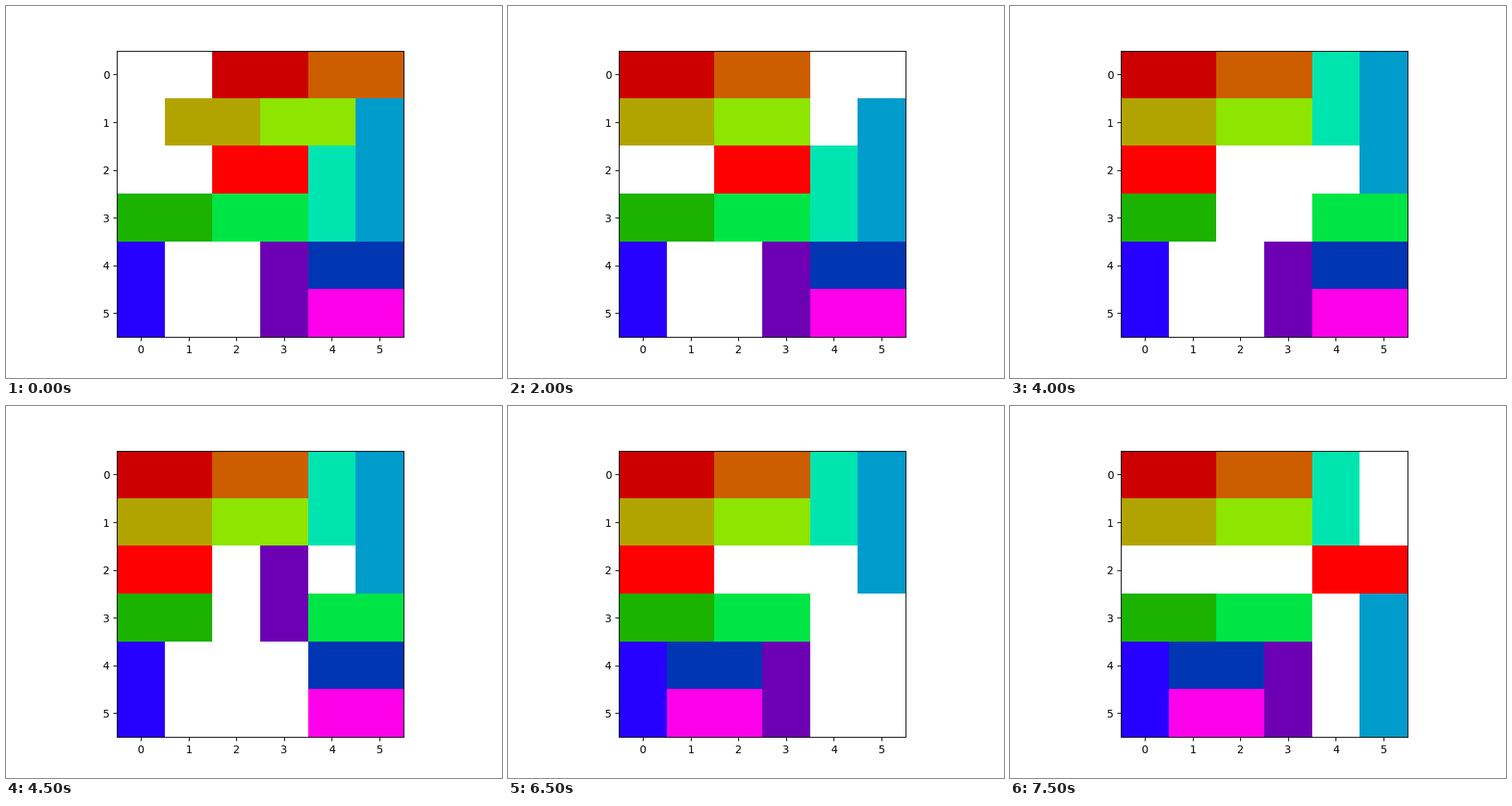
These frames come from a looping animation (640x480 px, 8 s). A matplotlib script:

```python
import colorsys

import matplotlib.pyplot as plt
import numpy as np
from matplotlib.animation import FuncAnimation

SIZE = 6
STEP_MS = 500

# name: (row, column, length, orientation, brightness); hues follow this order
CARS = {
    "A": (0, 2, 2, "h", 0.8),
    "B": (0, 4, 2, "h", 0.8),
    "C": (1, 1, 2, "h", 0.7),
    "D": (1, 3, 2, "h", 0.9),
    "E": (3, 0, 2, "h", 0.7),
    "F": (3, 2, 2, "h", 0.9),
    "G": (2, 4, 2, "v", 0.9),
    "H": (1, 5, 3, "v", 0.8),
    "I": (4, 4, 2, "h", 0.7),
    "J": (4, 0, 2, "v", 1.0),
    "K": (4, 3, 2, "v", 0.7),
    "L": (5, 4, 2, "h", 1.0),
    "X": (2, 2, 2, "h", 1.0),
}

# Each move slides one car along its own axis by a number of cells
MOVES = [("A", -2), ("B", -2), ("C", -1), ("D", -1), ("G", -2),
         ("H", -1), ("F", 2), ("X", -2), ("K", -2), ("I", -3),
         ("L", -3), ("K", 2), ("F", -2), ("H", 3), ("X", 4)]


def car_color(index, name, brightness):
    hue = 0 if name == "X" else index / len(CARS)
    return colorsys.hsv_to_rgb(hue, 1, brightness)


def board_after(move_count):
    shift = dict.fromkeys(CARS, 0)
    for name, cells in MOVES[:move_count]:
        shift[name] += cells
    board = np.ones((SIZE, SIZE, 3))
    for index, (name, car) in enumerate(CARS.items()):
        row, col, length, orientation, brightness = car
        color = car_color(index, name, brightness)
        if orientation == "h":
            col += shift[name]
            board[row, col:col + length] = color
        else:
            row += shift[name]
            board[row:row + length, col] = color
    return board


fig, ax = plt.subplots(figsize=(6.4, 4.8), dpi=100)
image = ax.imshow(board_after(0))


def update(frame):
    image.set_data(board_after(frame))
    return (image,)


anim = FuncAnimation(fig, update, frames=len(MOVES) + 1, interval=STEP_MS,
                     repeat=True, repeat_delay=0)
plt.show()
```
